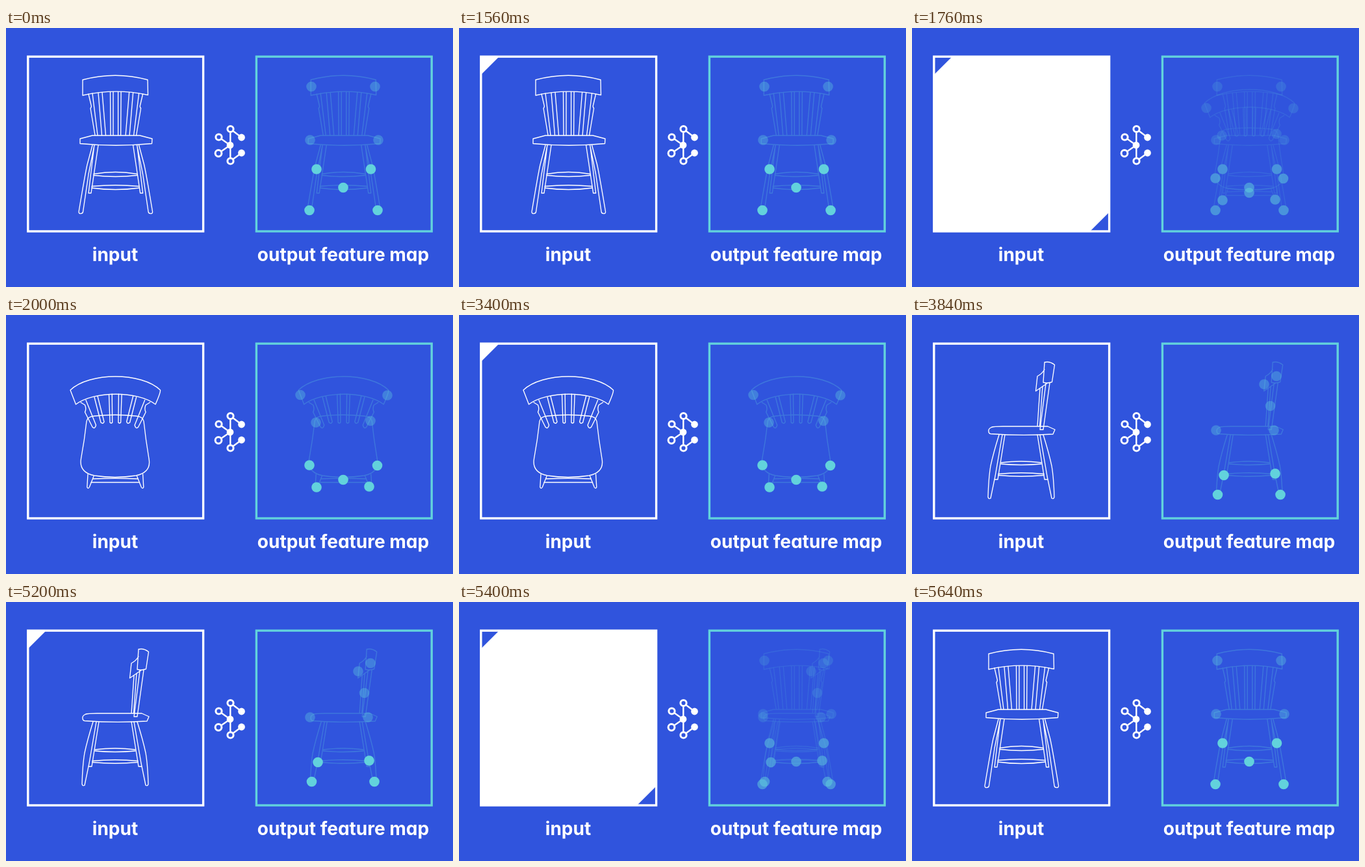
Write an HTML page that moves like this. It is 688 px wide and 400 px high and loops after 5.68 s.

```html
<!DOCTYPE html>
<html lang="en">
<head>
<meta charset="utf-8">
<title>Feature map</title>
<style>
  html, body { margin: 0; width: 100%; height: 100%; overflow: hidden; background: #3054dd; }
  svg { display: block; width: 688px; height: 400px; }
  .chair { fill: none; stroke-width: 1.35; stroke-linejoin: round; stroke-linecap: round; }
  .frame { fill: none; stroke-width: 3.4; }
  text { font: 700 28px Inter, "Open Sans", sans-serif; font-feature-settings: "cv11"; fill: #fff; text-anchor: middle; }
</style>
</head>
<body>
<svg viewBox="0 0 688 400">
  <defs>
    <clipPath id="box"><rect x="33" y="43" width="271" height="271"/></clipPath>
    <clipPath id="trailClip"><polygon id="trailShape"/></clipPath>
  </defs>
  <rect width="688" height="400" fill="#3054dd"/>

  <g clip-path="url(#box)">
    <g id="inOld"></g>
    <polygon id="lead" fill="#fff"/>
    <polygon id="trail" fill="#3054dd"/>
    <g clip-path="url(#trailClip)"><g id="inNew"></g></g>
  </g>
  <rect class="frame" x="33.8" y="44.2" width="269.8" height="269.8" stroke="#fff"/>

  <g id="output"></g>
  <rect class="frame" x="385.4" y="44.2" width="269.8" height="269.8" stroke="#62d2dc"/>

  <g fill="#3054dd" stroke="#fff" stroke-width="2.4">
    <path d="M345.3 156V205.5M327.5 168.5L345 181L327 193.5M345.5 156L362.5 169M345.5 205.5L362.5 193"/>
    <g stroke-width="3">
      <circle cx="345.5" cy="156" r="4.6"/>
      <circle cx="327.5" cy="168.5" r="4.6"/>
      <circle cx="327" cy="193.5" r="4.9"/>
      <circle cx="345.5" cy="205.5" r="4.6"/>
    </g>
    <g fill="#fff" stroke="none">
      <circle cx="345" cy="181" r="5.4"/>
      <circle cx="362.5" cy="169" r="5.4"/>
      <circle cx="362.5" cy="193" r="5.4"/>
    </g>
  </g>

  <text x="168" y="360">input</text>
  <text x="519" y="360">output feature map</text>
</svg>
<script>
// Each view: whole outlines, a left half mirrored about `axis`, and keypoints (first `dim` are faded).
const views = [
  {
    axis: 168.8,
    whole: `M118 80Q168.5 66.5 218 80L218.5 103.5Q168.5 92.5 118 104Z
      M114 171L133 166H206L225 171L224.5 178.5Q169 184 114 178.5Z
      M135 225.5Q168.5 219.5 202 225.5M135 227.5Q168.5 231.5 202 227.5
      M132 244.5Q168.5 241 205 244.5M132 247Q168.5 252 205 247`,
    half: `M127 102L131 119Q132 122 130 124L137 165.5M133 101L141 165.5
      M142 100L147.5 165.5M148 99.5L153.5 165.5M160.5 98.5L161 165.5M165 98.5V165.5
      M133 181Q130 192 125 211Q122 224 112 284Q112 287 115.5 286.5Q118 286.5 118.5 284L127 226L136 181
      M135.5 184L127 255H131L142 181`,
    dim: 4,
    dots: [470,90.5, 568,90.5, 468,173, 573,173, 478,218, 561.5,218, 519,246.5, 467,281.5, 572,281.5]
  },
  {
    axis: 168.3,
    whole: `M99 116C128 88 209 88 237.5 116Q238 120 230 138C202 117 136 117 107.5 138Z
      M124 164Q125 157 136 156Q168 152.5 200 156Q211 157 212 164Q215 192 220 222Q224 243 200 248
      Q168 253 136 248Q112 243 115.5 222Q121 192 124 164Z
      M134 253Q168 251.5 203 253M131 258.5H205.5`,
    half: `M115 135L121.5 139Q124 145 121.5 150L133 173Q137 177 138.5 170L123 131.5
      M136 127L146 166Q149.5 169 151 165L141 125.5M158.5 123L160 166Q162 168 163.7 166L163.2 122
      M126 246L124.8 266Q126.5 269 128.3 266L135 249`,
    dim: 4,
    dots: [453,123.5, 587,124, 477,166, 561,163.5, 467,232, 571.5,232.5, 519,254.5, 478,266, 559,265]
  },
  {
    axis: 168,
    whole: `M204 73Q212 71 219.5 77L215.5 103.5Q208 106 202 104Z
      M204 84Q200 91 193 94.5L190.5 117.5L208 105.5
      M197 113L193 172M201 110L196.5 172M206 106L197 177H202L212 105
      M118 180Q117 176 122 173.5Q126 172 140 172H209L220 177L217 184Q168 187 121 183.5Q118 183 118 180Z
      M137 228Q168 224 199 228M137 230Q168 233 199 230
      M133 245.5Q168 242 203 245.5M133 247.5Q168 251 203 247.5`,
    half: `M134 185Q125 214 121 233Q118 250 117 281Q118 285 121 283L128 249L139 185M143 185L132 254H127.5`,
    dim: 5,
    dots: [561,94.5, 542,107, 551.5,140.5, 468,178, 557,178, 480,247.5, 559,245, 470.5,277.5, 567,277.5]
  }
];

const starts = [1560, 3400, 5200];
const LOOP = 5680, STEP = 40, STEPS = 12, SWEEP = 7;
const X = 33, Y = 43, REACH = 542;
const el = id => document.getElementById(id);

function chair(v, stroke, extra = "") {
  return `<g class="chair" stroke="${stroke}" ${extra}><path d="${v.whole}"/><path d="${v.half}"/>
    <path d="${v.half}" transform="translate(${2 * v.axis}) scale(-1 1)"/></g>`;
}

function keypoints(v) {
  let out = "";
  for (let i = 0; i < v.dots.length; i += 2) {
    const alpha = i / 2 < v.dim ? 0.35 : 1;
    out += `<circle cx="${v.dots[i]}" cy="${v.dots[i + 1]}" r="7.8" fill="#62d2dc" opacity="${alpha}"/>`;
  }
  return out;
}

function addLayers(parent, draw) {
  parent.innerHTML = views.map(v => `<g>${draw(v)}</g>`).join("");
  return [...parent.children];
}

const oldLayers = addLayers(el("inOld"), v => chair(v, "#fff"));
const newLayers = addLayers(el("inNew"), v => chair(v, "#fff"));
const outLayers = addLayers(el("output"), v =>
  chair(v, "#62d2dc", 'opacity=".28" transform="translate(351.2)"') + keypoints(v));

const clamp = x => Math.min(1, Math.max(0, x));
const ease = p => p * p * (3 - 2 * p);
const corner = d => `${X},${Y} ${X + d},${Y} ${X},${Y + d}`;
const showOnly = (layers, n) => layers.forEach((g, i) => g.style.display = i === n ? "" : "none");

function render(t) {
  let view = 0, step = 0;
  starts.forEach((start, i) => {
    if (t < start) return;
    const k = Math.floor((t - start) / STEP) + 1;
    view = k < STEPS ? i : (i + 1) % views.length;
    step = k < STEPS ? k : 0;
  });
  const next = (view + 1) % views.length;
  const trail = corner(REACH * ease(clamp((step - STEPS + SWEEP) / SWEEP)));

  showOnly(oldLayers, view);
  showOnly(newLayers, next);
  el("lead").setAttribute("points", corner(REACH * ease(clamp(step / SWEEP))));
  el("trail").setAttribute("points", trail);
  el("trailShape").setAttribute("points", trail);

  const fade = clamp((step - 3) / 6);
  outLayers.forEach((g, i) => g.style.opacity = i === view ? 1 - fade : i === next ? fade : 0);
}

const began = performance.now();
function tick() {
  render((performance.now() - began) % LOOP);
  requestAnimationFrame(tick);
}
tick();
</script>
</body>
</html>
```
